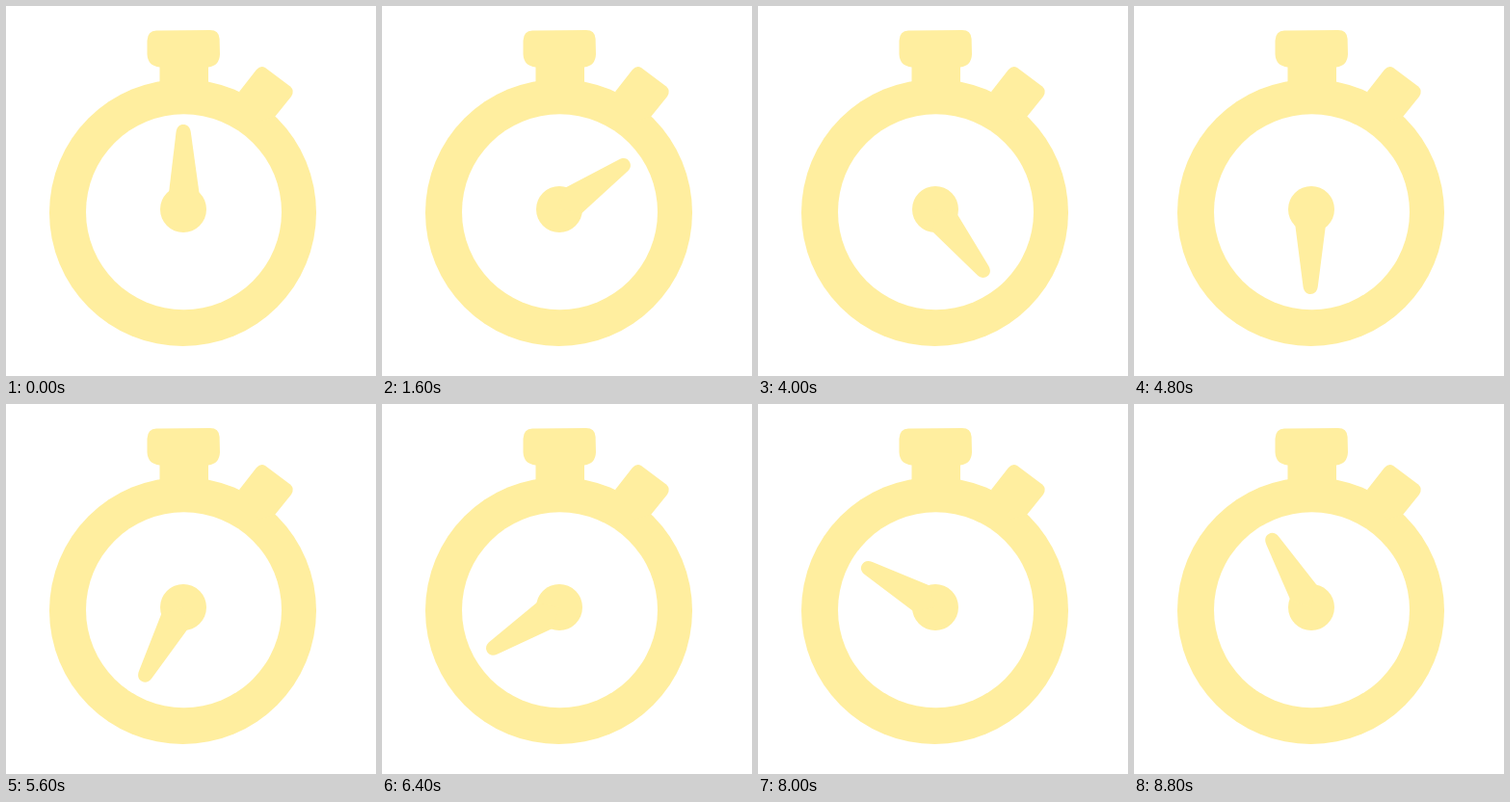
An HTML page for the animation above (9600 ms loop, 384 by 384 pixels).

```html
<!DOCTYPE html>
<html lang="en">
<head>
<meta charset="utf-8">
<title>Stopwatch</title>
<style>
  html, body { margin: 0; width: 100%; height: 100%; overflow: hidden; background: #fff; }
  svg { display: block; width: 100%; height: 100%; }
</style>
</head>
<body>
<svg viewBox="0 0 384 384" fill="#ffee9f">
  <circle cx="183.5" cy="214.5" r="138.5"/>
  <path d="M156 25.5L212 25Q221 25 221.6 34L222 50Q221.5 62 210 63.5V84H159.5V63.5Q147 62 146.5 50V36Q147 25.5 156 25.5Z"/>
  <path d="M242 89L260 66Q264.500 61 269 64L295 83.500Q300 88 296 94L279 115L262 120Z"/>
  <circle cx="184.5" cy="213.7" r="101.5" fill="#fff"/>
  <circle cx="184" cy="211" r="24"/>
  <path id="hand" d="M169 194L176.500 131C177.300 125.500 180 123 184 123S191 125.500 191.800 131L200.500 194L184 211Z"/>
</svg>
<script>
  const STEP = 800;
  // The hand jumps in slightly uneven ticks.
  const angles = [0, 33, 55.5, 91, 115.7, 142, 180.5, 209.3, 238.2, 270, 300.2, 329.8];
  const hand = document.getElementById('hand');
  const start = performance.now();

  function draw(ms) {
    const tick = Math.floor(Math.max(0, ms) / STEP) % angles.length;
    hand.setAttribute('transform', `rotate(${angles[tick]} 184 211)`);
  }

  function loop(now) {
    draw(now - start);
    requestAnimationFrame(loop);
  }

  draw(0);
  requestAnimationFrame(loop);
</script>
</body>
</html>
```
